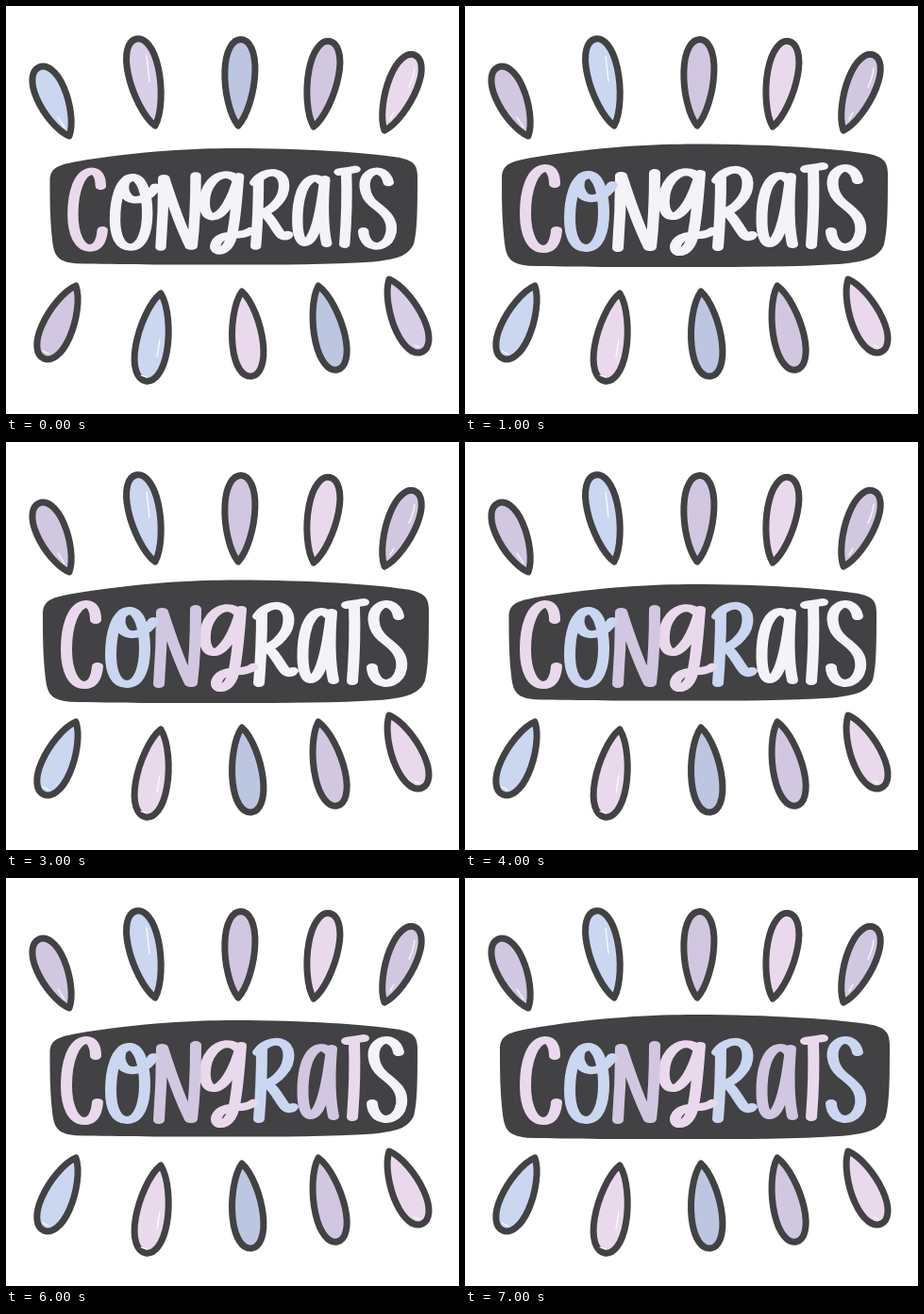
Animation of 480x433 px, one loop 8000 ms. Source, as an HTML page with a canvas:

```html
<!DOCTYPE html>
<html lang="en">
<head>
<meta charset="utf-8">
<title>Congrats</title>
<style>
html, body { margin: 0; width: 100%; height: 100%; overflow: hidden; background: #fff; }
canvas { display: block; width: 100vw; height: 100vh; }
</style>
</head>
<body>
<canvas id="stage" width="480" height="433" aria-label="Congrats"></canvas>
<script>
const ctx = document.getElementById('stage').getContext('2d');
const DARK = '#424143', WHITE = '#f4f4f8';
const PINK = '#ead9ec', BLUE = '#cbd6f1', LILAC = '#d2c7e1', STEEL = '#bdc6e1', MAUVE = '#d9cfe8';
const STEP = 1000, COUNT = 8;
const NIB = 1.5; // the pen is wider than it is high

// tip x, y, round end x, y, half width, two alternating fills
const petals = [
  [67, 138, 35, 65, 15.5, BLUE, LILAC],
  [158, 127, 138, 35, 16.3, MAUVE, BLUE],
  [246, 127, 249, 35.5, 16, STEEL, LILAC],
  [326, 128, 343, 37.5, 16, LILAC, PINK],
  [401, 132, 433, 52, 15.5, PINK, LILAC],
  [74, 297, 40, 374, 16, LILAC, BLUE],
  [164, 305, 148, 398, 16.8, BLUE, PINK],
  [250, 303, 260, 393, 16.2, PINK, STEEL],
  [331, 297, 351, 386, 16, STEEL, LILAC],
  [406, 290, 441, 367, 16, MAUVE, PINK]
];

// uncoloured slivers left inside the petals
const gaps = new Path2D(
  'M149 53 L152 80 M433 66 Q432 76 427 86 M55 118 L62 129 M39 366 L45 369 ' +
  'M143 392 L149 394 M163 354 L160 372 M433 360 L438 362 M407 120 L411 113'
);

const BANNERS = {
  S: [46.5, 151, 436, 274.5],
  M: [39, 146.5, 448, 277],
  W: [37, 145, 450, 277],
  L: [25, 142.5, 459.5, 281.5]
};
const pulse = 'SMLMSLSW';

const bannerShape = new Path2D(
  'M0 .28 C0 .17 .02 .145 .07 .115 C.25 .02 .4 0 .5 0 C.7 0 .86 .04 .93 .07 ' +
  'C.985 .09 1 .13 1 .24 C1 .5 1 .7 .99 .82 C.975 .93 .94 .955 .88 .975 ' +
  'C.76 1 .62 1 .5 1 C.3 1 .2 1 .07 .99 C.02 .975 .012 .92 .007 .8 C0 .6 0 .45 0 .28Z'
);

const word = [
  // C
  [PINK, 'M95 189 C95 178 91 172 85 172 C71 173 64 196 64 220 C64 244 72 258 83 258 C92 258 96 250 97 238'],
  // o
  [BLUE, 'M132 179 C116 179 111 206 111 226 C111 245 117 257 128 257 C141 257 147 240 147 219 ' +
    'C147 198 141 179 131 179 C119 179 118 193 125 201 C133 208 149 203 156 190'],
  // n
  [LILAC, 'M165 180 C165 205 164 231 162 257 M166 180 C174 205 184 234 195 256 M201 177 C201 203 200 231 197 256'],
  // g
  [PINK, 'M247 182 C239 173 227 175 219 184 C208 197 208 221 219 223 C231 224 243 202 249 178 ' +
    'C247 200 246 221 242 241 C240 254 233 262 226 261 C220 258 223 248 233 245 C243 242 253 245 262 239'],
  // r
  [BLUE, 'M271 180 C271 205 270 232 268 256 M267 185 C273 176 282 173 289 174 C303 177 302 196 292 207 ' +
    'C287 213 281 217 276 218 C284 222 290 236 296 243 C299 246 302 246 304 243'],
  // a
  [LILAC, 'M342 184 C335 176 325 180 319 195 C313 212 312 250 322 252 C333 252 340 224 345 181 C343 205 343 234 347 253'],
  // t
  [PINK, 'M361 173 C367 172 374 171 379 170 M369 174 C370 201 369 229 367 254'],
  // s
  [BLUE, 'M416 185 C414 174 405 170 398 173 C385 180 388 199 400 209 C413 219 421 226 419 240 ' +
    'C416 256 402 259 394 253 C390 249 388 244 388 239']
];

// squeezed here, then stretched back with the pen when stroked
const letters = word.map(([color, d]) => {
  const path = new Path2D();
  path.addPath(new Path2D(d), new DOMMatrix([1 / NIB, 0, 0, 1, 0, 0]));
  return { color, path };
});

function drawPetal([x, y, ex, ey, w, ...fills], beat) {
  const len = Math.hypot(ex - x, ey - y);
  ctx.save();
  ctx.translate(x, y);
  ctx.rotate(Math.atan2(ey - y, ex - x) - Math.PI / 2);
  ctx.beginPath();
  ctx.moveTo(0, 0);
  ctx.bezierCurveTo(w * 0.6, len * 0.12, w, len * 0.4, w, len * 0.63);
  ctx.bezierCurveTo(w, len * 0.87, w * 0.55, len, 0, len);
  ctx.bezierCurveTo(-w * 0.55, len, -w, len * 0.87, -w, len * 0.63);
  ctx.bezierCurveTo(-w, len * 0.4, -w * 0.6, len * 0.12, 0, 0);
  ctx.closePath();
  ctx.fillStyle = fills[beat];
  ctx.fill();
  ctx.strokeStyle = DARK;
  ctx.lineWidth = 7;
  ctx.stroke();
  ctx.restore();
}

function drawBanner([x0, y0, x1, y1]) {
  ctx.save();
  ctx.translate(x0, y0);
  ctx.scale(x1 - x0, y1 - y0);
  ctx.fillStyle = DARK;
  ctx.fill(bannerShape);
  ctx.restore();
}

function drawWord(step) {
  ctx.save();
  if (step === 0) {
    ctx.translate(239.5, 216.5);
    ctx.scale(0.95, 0.95);
    ctx.translate(-241.5, -215.5);
  }
  ctx.scale(NIB, 1);
  ctx.lineWidth = 8;
  // later letters go first, so coloured joins stay on top
  for (let i = letters.length - 1; i >= 0; i--) {
    ctx.strokeStyle = i <= step ? letters[i].color : WHITE;
    ctx.stroke(letters[i].path);
  }
  ctx.restore();
}

function draw(step) {
  const beat = step === 0 || step === 2 || step === 5 ? 0 : 1;
  ctx.fillStyle = '#fff';
  ctx.fillRect(0, 0, 480, 433);
  ctx.lineCap = ctx.lineJoin = 'round';
  petals.forEach(p => drawPetal(p, beat));
  ctx.strokeStyle = '#fff';
  ctx.lineWidth = 1.2;
  ctx.stroke(gaps);
  drawBanner(BANNERS[pulse[step]]);
  drawWord(step);
}

const start = performance.now();
function tick() {
  draw(Math.floor((performance.now() - start) / STEP) % COUNT);
  requestAnimationFrame(tick);
}
tick();
</script>
</body>
</html>
```
